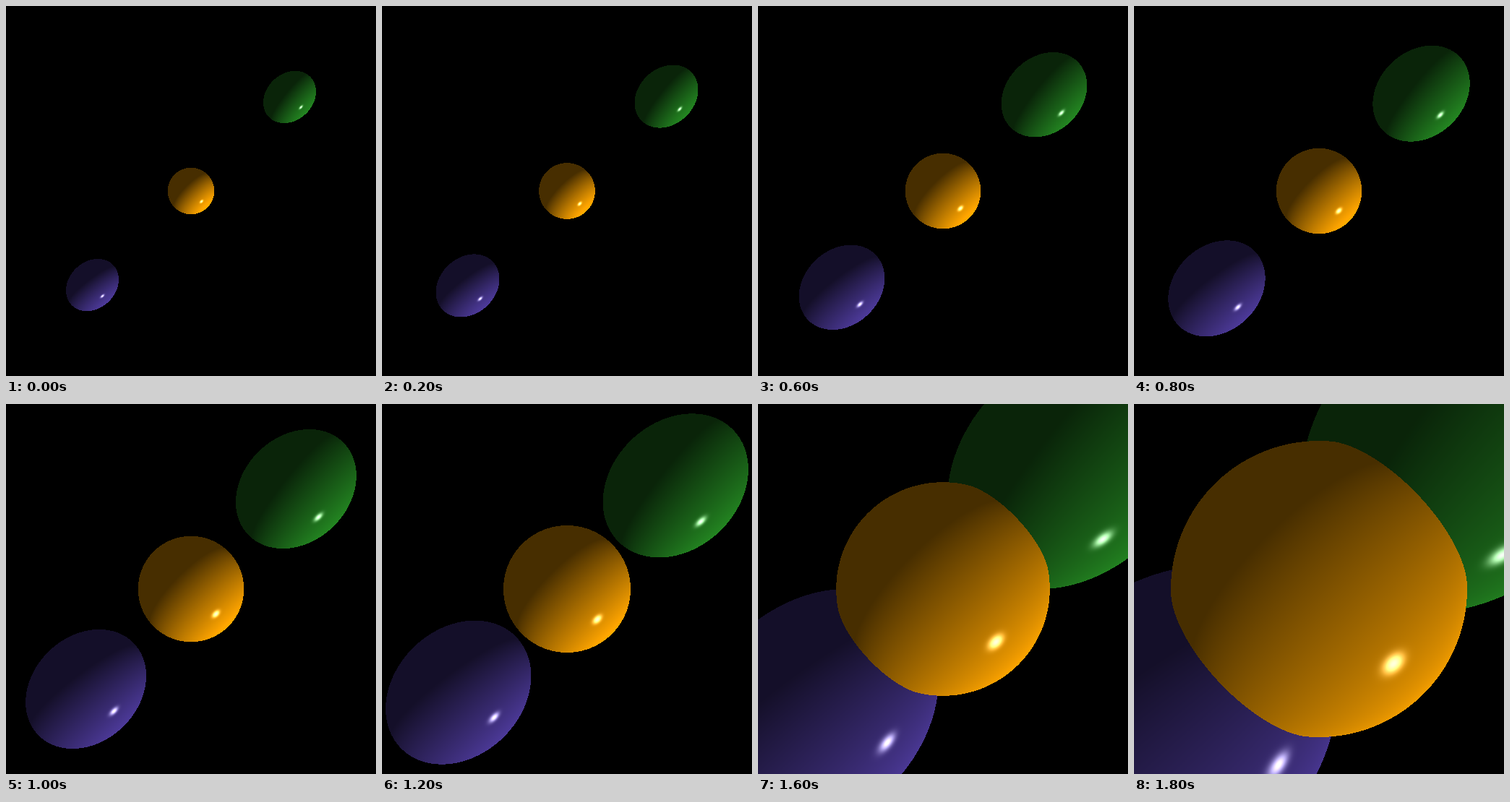
An HTML page with a canvas for the animation above (2000 ms loop, 512 px wide and 512 px high).

```html
<!DOCTYPE html>
<html lang="en">
<head>
<meta charset="utf-8">
<title>Growing spheres</title>
<style>
html, body { margin: 0; width: 100%; height: 100%; overflow: hidden; background: #000; }
canvas { display: block; }
</style>
</head>
<body>
<canvas id="stage" width="512" height="512"></canvas>
<script>
const SIZE = 512, HALF = SIZE / 2, STEP_MS = 200;
const RADII = [0.5, 0.6, 0.7, 0.8, 0.9, 1.1, 1.3, 1.6, 2, 2.5];
const SPHERES = [
  { center: [0, 0, 4], color: [255, 165, 0] },
  { center: [2.1, 2, 4], color: [34, 128, 32] },
  { center: [-2.1, -2, 4], color: [73, 55, 146] },
];
const AMBIENT = 0.28, DIFFUSE = 0.77, SPECULAR = 0.87, SHININESS = 180;

const dot = (a, b) => a[0] * b[0] + a[1] * b[1] + a[2] * b[2];
const normalize = v => v.map(c => c / Math.sqrt(dot(v, v)));
const LIGHT = normalize([0.684, -0.684, -0.254]);

// Distance along a unit ray from the camera at the origin.
function hit(ray, center, radius) {
  const along = dot(ray, center);
  const disc = along * along - dot(center, center) + radius * radius;
  return disc < 0 ? Infinity : along - Math.sqrt(disc);
}

function shade(ray, distance, { center, color }, radius) {
  const normal = ray.map((c, i) => (c * distance - center[i]) / radius);
  const facing = dot(normal, LIGHT);
  const lit = Math.max(0, facing);
  const reflected = 2 * facing * dot(normal, ray) - dot(LIGHT, ray);
  // The mirrored light direction, compared with the direction to the camera.
  const gloss = facing > 0 ? Math.max(0, -reflected) : 0;
  const mirror = SPECULAR * 255 * gloss ** SHININESS;
  return color.map(c => c * (AMBIENT + DIFFUSE * lit) + mirror);
}

function render(radius) {
  const image = new ImageData(SIZE, SIZE);
  for (let y = 0, p = 0; y < SIZE; y++) {
    for (let x = 0; x < SIZE; x++, p += 4) {
      const ray = normalize([(x + 0.5 - HALF) / HALF, (HALF - y - 0.5) / HALF, 1]);
      let nearest = Infinity, sphere;
      for (const s of SPHERES) {
        const distance = hit(ray, s.center, radius);
        if (distance < nearest) { nearest = distance; sphere = s; }
      }
      if (sphere) image.data.set(shade(ray, nearest, sphere, radius), p);
      image.data[p + 3] = 255;
    }
  }
  return image;
}

const ctx = document.getElementById("stage").getContext("2d");
const images = RADII.map(render);
const start = performance.now();
let shown = -1;

function draw() {
  const elapsed = Math.max(0, performance.now() - start);
  const step = Math.floor(elapsed / STEP_MS) % RADII.length;
  if (step !== shown) ctx.putImageData(images[shown = step], 0, 0);
  requestAnimationFrame(draw);
}
draw();
</script>
</body>
</html>
```
